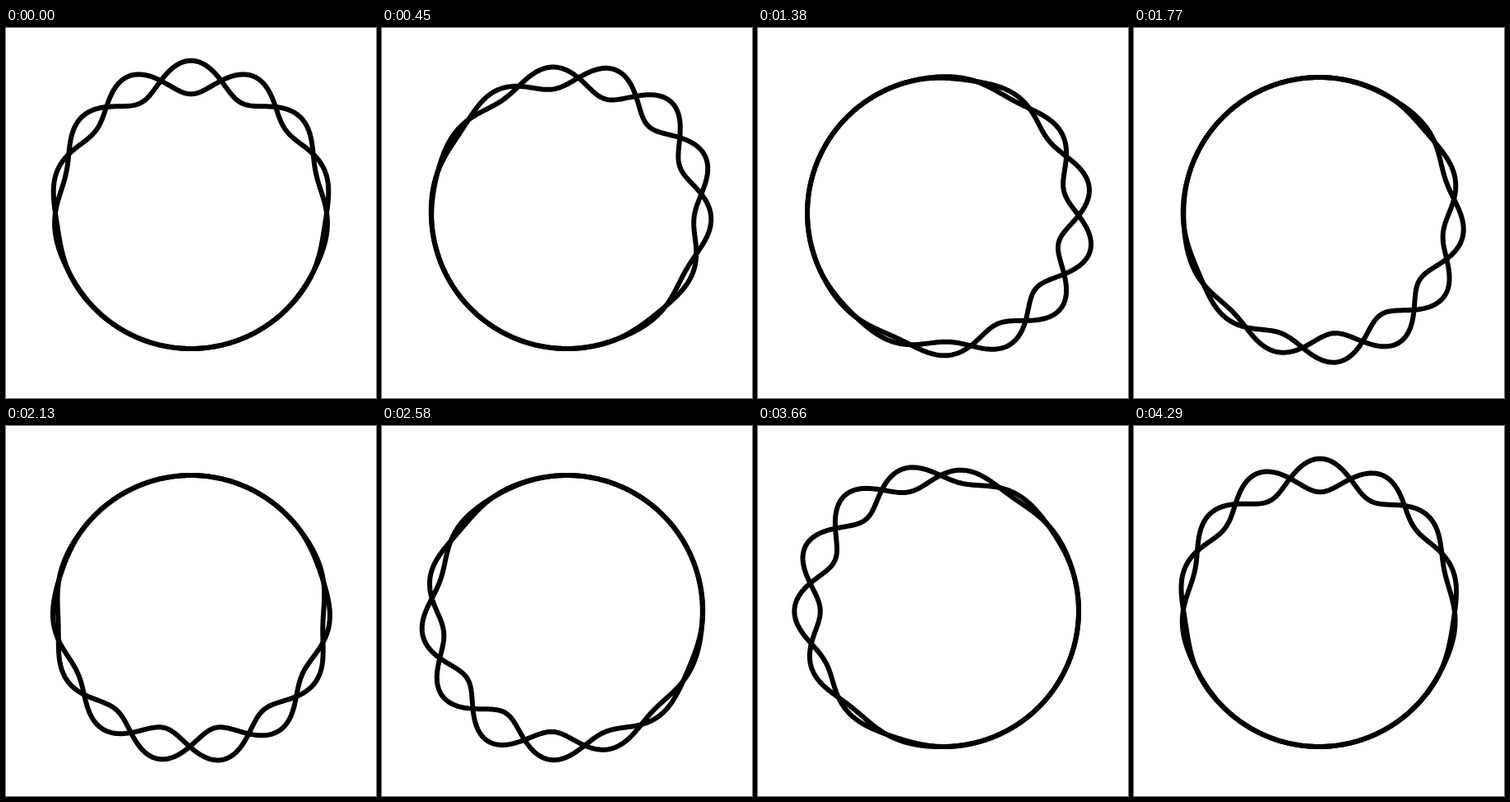
An HTML page for the animation above (4.32 s loop, 450 px wide and 450 px high).

```html
<!DOCTYPE html>
<html lang="en">
<head>
<meta charset="utf-8">
<title>Braided ring</title>
<style>
  html, body { margin: 0; width: 100%; height: 100%; overflow: hidden; background: #fff; }
  svg { display: block; width: 100%; height: 100%; }
  path { fill: none; stroke: #000; stroke-width: 6; stroke-linejoin: round; }
</style>
</head>
<body>
<svg viewBox="0 0 450 450">
  <path></path>
  <path></path>
</svg>
<script>
const LOOP = 4320;
const STEP = 30;
const CENTER = 225;
const RADIUS = 165;
const AMPLITUDE = 20.3;
const WAVES = 7;
const FALLOFF = 5.2;
const POINTS = 540;
const TAU = Math.PI * 2;
const strands = document.querySelectorAll('path');

// Angles run clockwise from the top; the swell travels forward while the wave drifts back.
function offset(angle, swell) {
  const envelope = Math.abs(Math.cos((angle - swell) / 2)) ** FALLOFF;
  return AMPLITUDE * envelope * Math.cos(WAVES * angle + 1.5 * swell);
}

function strandPath(swell, side) {
  const points = Array.from({ length: POINTS }, (_, i) => {
    const angle = i / POINTS * TAU;
    const r = RADIUS + side * offset(angle, swell);
    const x = CENTER + r * Math.sin(angle);
    const y = CENTER - r * Math.cos(angle);
    return x.toFixed(2) + ' ' + y.toFixed(2);
  });
  return 'M' + points.join('L') + 'Z';
}

function render(ms) {
  const time = Math.floor(ms % LOOP / STEP) * STEP;
  const swell = time / LOOP * TAU;
  strands[0].setAttribute('d', strandPath(swell, 1));
  strands[1].setAttribute('d', strandPath(swell, -1));
}

function tick() {
  render(performance.now());
  requestAnimationFrame(tick);
}
tick();
</script>
</body>
</html>
```
